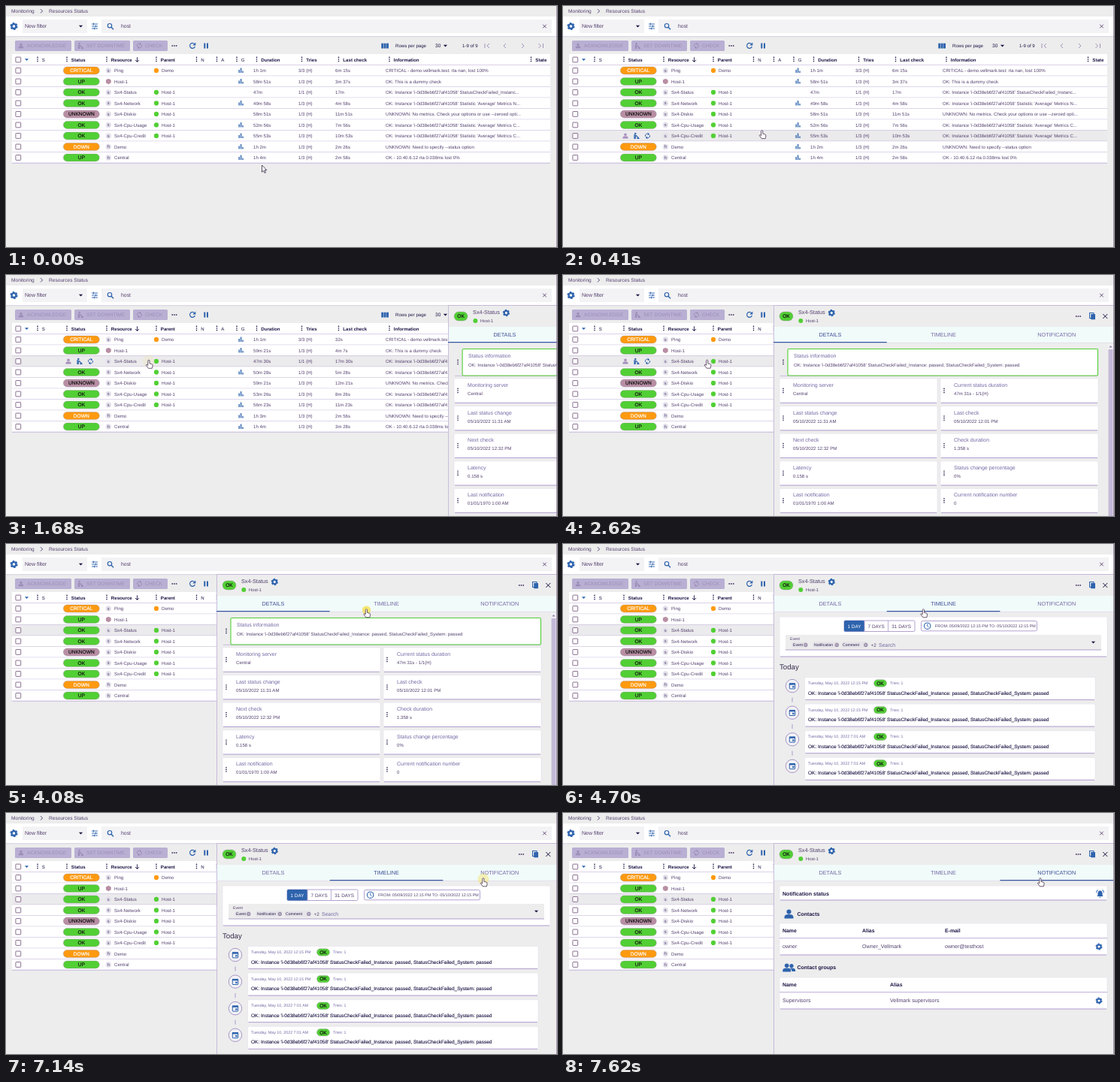
An HTML page that plays this animation: 733 px wide and 321 px high, repeating every 8 s.

```html
<!DOCTYPE html>
<html lang="en">
<head>
<meta charset="utf-8">
<title>Resource monitoring</title>
<style>
  html, body { margin: 0; width: 100%; height: 100%; overflow: hidden; background: #ededed; }
  svg { display: block; width: 733px; height: 321px; }
  text { font-family: "Liberation Sans", Arial, sans-serif; text-rendering: geometricPrecision; white-space: pre; }
</style>
</head>
<body>
<svg id="stage" viewBox="0 0 733 321" xmlns="http://www.w3.org/2000/svg"></svg>
<script>
const LOOP = 8000;
const BLUE = '#2e63ad', INK = '#54406f', DARK = '#1d1545', SOFT = '#7468a4', LINE = '#ab98cc';
const GREEN = '#52cf35', ORANGE = '#ff9a10', MAUVE = '#b88ea4', GREY = '#ededed', FIELD = '#f3f2f4';

// Drawing helpers
const rect = (x, y, w, h, fill, extra = '') =>
  `<rect x="${x}" y="${y}" width="${w}" height="${h}" fill="${fill}" ${extra}/>`;
const circle = (x, y, r, fill, extra = '') => `<circle cx="${x}" cy="${y}" r="${r}" fill="${fill}" ${extra}/>`;
const path = (d, fill = 'none', extra = '') => `<path d="${d}" fill="${fill}" ${extra}/>`;
const stroke = (color, width = 1) => `stroke="${color}" stroke-width="${width}"`;
const group = (body, attrs = '') => `<g ${attrs}>${body}</g>`;
const at = (x, y, body, k = 1) => group(body, `transform="translate(${x} ${y}) scale(${k})"`);
const text = (x, y, s, size = 6.1, fill = INK, extra = '') =>
  `<text x="${x}" y="${y}" font-size="${size}" fill="${fill}" ${extra}>${s}</text>`;
const bold = (x, y, s, size = 6.15, fill = DARK) => text(x, y, s, size, fill, 'font-weight="700"');
const middle = (x, y, s, size, fill, extra = '') => text(x, y, s, size, fill, 'text-anchor="middle" ' + extra);
const card = (x, y, w, h) => rect(x, y, w, h, '#fff', 'rx="1.5" ' + stroke('#e0dbe8', .5)) +
  path(`M${x + 1} ${y + h}h${w - 2}`, 'none', stroke(LINE, .9));

// Icons
const dots = (x, y, fill = DARK) => [-2.6, 0, 2.6].map(d => circle(x, y + d, .8, fill)).join('');
const more = (x, y) => [-2.7, 0, 2.7].map(d => circle(x + d, y, .95, INK)).join('');
const caret = (x, y, fill = DARK) => path(`M${x - 2.6} ${y - 1.2}h5.2l-2.6 2.8z`, fill);
const gear = (x, y, r = 3) => circle(x, y, r * .9, 'none', stroke(BLUE, r * .7)) +
  circle(x, y, r * 1.35, 'none', stroke(BLUE, r * .4) + ` stroke-dasharray="${r * .75} ${r * .664}"`);
const cross = (x, y, r, color, w = 1) => path(`M${x - r} ${y - r}l${2 * r} ${2 * r}m0 ${-2 * r}l${-2 * r} ${2 * r}`, 'none', stroke(color, w));
const checkbox = (x, y) => rect(x - 3.4, y - 3.4, 6.8, 6.8, '#fff', 'rx=".6" ' + stroke('#8b6f92', 1));
const person = (x, y, fill, k = 1) => at(x, y, circle(0, -1.7, 1.8, fill) + path('M-3.5 3.5v-1.2q0-2 3.5-2t3.5 2v1.2z', fill), k);
const sync = (x, y, color) => at(x, y, path('M-3 .8a3 3 0 0 1 5-2.9M3-.8a3 3 0 0 1-5 2.9', 'none', stroke(color, 1)) +
  path('M.4-4.2l2.2 2-2.2 1.6zM-.4 4.2l-2.2-2 2.2-1.6z', color));
const worker = (x, y, color) => at(x, y, circle(-1.2, -3, 1.2, color) +
  path('M-2.5 4v-5l3 1 1.2 2v2M-1 0l-.4 4', 'none', stroke(color, 1.2)) + path('M.8 4l1.8-3 1.8 3z', color));
const bell = (x, y) => at(x, y, path('M-3.7 3.5l1-1.3v-2.6q.3-2.4 2.7-2.8q2.4.4 2.7 2.8v2.6l1 1.3zM-1.2 4.1h2.4l-1.2 1.2z', BLUE) +
  path('M-4.3-.9q.2-2 1.7-3.2M4.3-.9q-.2-2-1.7-3.2', 'none', stroke(BLUE, .9)), 1.15);
const graph = (x, y) => [[-3, 4], [-.6, 6.4], [1.8, 2.4]].map(([d, h]) => rect(x + d, y + 3 - h, 1.4, h, BLUE)).join('');
const pill = (x, y, w, h, label, fill, ink = '#111', size = 6.6) =>
  rect(x - w / 2, y - h / 2, w, h, fill, `rx="${h / 2}" ` + stroke('#9a8fa0', .4)) +
  middle(x, y + size * .36, label, size, ink, stroke(ink, .2));
const okPill = (x, y, w, h) => pill(x, y, w, h, 'OK', GREEN);

// Table
const INSTANCE = "OK: Instance 'i-0d38eb6f27af41058' ";
const PASSED = INSTANCE + 'StatusCheckFailed_Instance: passed, StatusCheckFailed_System: passed';
// status, type, name, parent, has graph, tries, information, [duration, last check] before and after the refresh
const ROWS = [
  ['CRITICAL', 's', 'Ping', 'Demo', 1, '3/3 (H)', 'CRITICAL - demo.vellmark.test: rta nan, lost 100%', ['1h 1m', '6m 15s'], ['1h 1m', '32s']],
  ['UP', '', 'Host-1', '', 1, '1/3 (H)', 'OK: This is a dummy check', ['58m 51s', '3m 37s'], ['59m 21s', '4m 7s']],
  ['OK', 's', 'Sx4-Status', 'Host-1', 0, '1/1 (H)', INSTANCE + 'StatusCheckFailed_Instanc...', ['47m', '17m'], ['47m 30s', '17m 30s']],
  ['OK', 's', 'Sx4-Network', 'Host-1', 1, '1/3 (H)', INSTANCE + "Statistic 'Average' Metrics N...", ['49m 58s', '4m 58s'], ['50m 28s', '5m 28s']],
  ['UNKNOWN', 's', 'Sx4-Diskio', 'Host-1', 0, '1/3 (H)', 'UNKNOWN: No metrics. Check your options or use --zeroed opti...', ['58m 51s', '11m 51s'], ['59m 21s', '12m 21s']],
  ['OK', 's', 'Sx4-Cpu-Usage', 'Host-1', 1, '1/3 (H)', INSTANCE + "Statistic 'Average' Metrics C...", ['52m 56s', '7m 56s'], ['53m 26s', '8m 26s']],
  ['OK', 's', 'Sx4-Cpu-Credit', 'Host-1', 1, '1/3 (H)', INSTANCE + "Statistic 'Average' Metrics C...", ['55m 53s', '10m 53s'], ['56m 23s', '11m 23s']],
  ['DOWN', 'h', 'Demo', '', 1, '1/3 (H)', 'UNKNOWN: Need to specify --status option', ['1h 2m', '2m 26s'], ['1h 3m', '2m 56s']],
  ['UP', 'h', 'Central', '', 1, '1/3 (H)', 'OK - 10.40.6.12 rta 0.038ms lost 0%', ['1h 4m', '2m 58s'], ['1h 4m', '3m 28s']]
];
const FILL = { CRITICAL: ORANGE, DOWN: ORANGE, UNKNOWN: MAUVE };
const ROW_TOP = 78.7, ROW_H = 14.5;

function tableRow([status, type, name, parent, chart, tries, info], i) {
  const y = ROW_TOP + ROW_H * (i + .5), base = y + 2.2;
  const hot = FILL[status] === ORANGE;
  return rect(8, y - ROW_H / 2, 716, ROW_H, '#fff', `id="row${i}"`) +
    path(`M8 ${y + ROW_H / 2}h716`, 'none', stroke(LINE, .7)) + checkbox(16.3, y) +
    group(pill(100.3, y, 48, 10, status, FILL[status] || GREEN, hot ? '#fff' : '#111'), `id="status${i}"`) +
    group(person(83, y, '#a68fbd') + worker(97.5, y, BLUE) + sync(112.5, y, BLUE), `id="tools${i}"`) +
    (type ? circle(136.3, y, 3.7, '#e3e0ea') + middle(136.3, y + 2, type, 5.8, INK)
      : path(`M136.3 ${y - 3.8}l3.4 1.9v3.8l-3.4 1.9l-3.4-1.9v-3.8z`, MAUVE)) +
    text(144, base, name) +
    (parent ? circle(200, y, 3.1, parent === 'Demo' ? ORANGE : GREEN) + text(207, base, parent) : '') +
    (chart ? graph(312.5, y) : '') +
    text(329, base, '', 6.1, INK, `id="duration${i}"`) + text(389, base, tries) +
    text(438, base, '', 6.1, INK, `id="last${i}"`) + text(505, base, info);
}

function listView() {
  const heads = [[42, 'S'], [81, 'Status'], [134, 'Resource'], [200, 'Parent'], [253.5, 'N'], [280.5, 'A'], [307, 'G'],
    [333.5, 'Duration'], [393.5, 'Tries'], [442.5, 'Last check'], [510, 'Information'], [698.5, 'State']];
  const button = (x, w, label) => rect(x, 46, w, 14, '#b9afd3', 'rx="1.5"') +
    text(x + 16, 55.4, label, 6.6, '#9b8db8');
  const page = d => path(d, 'none', stroke('#a193b8', 1));
  return text(7, 9, 'Monitoring', 6.6) + path('M46 4.2l2.6 2.6-2.6 2.6', 'none', stroke(INK, 1)) +
    text(57, 9, 'Resources Status', 6.6) +
    rect(0, 14, 733, 26.5, '#fff') + path('M0 40.7h733', 'none', stroke('#c9bfd9', .7)) +
    gear(10.5, 27, 3.3) + rect(22, 18, 86, 18, FIELD) + text(25, 29.3, 'New filter', 7) + caret(99.5, 27) +
    [-3, 0, 3].map((d, i) => path(`M114 ${27 + d}h8M${[116.5, 119.5, 117.5][i]} ${25.6 + d}v2.8`, 'none', stroke(BLUE, .9))).join('') +
    rect(127, 18, 599, 18, FIELD) +
    circle(138, 26.2, 2.7, 'none', stroke(BLUE, 1.2)) + path('M140 28.2l3 3', 'none', stroke(BLUE, 1.4)) +
    text(153, 29.3, 'host', 6.9) + cross(716.5, 27, 2.3, INK, .9) +
    button(12, 75, 'ACKNOWLEDGE') + button(91, 74, 'SET DOWNTIME') + button(169, 46, 'CHECK') +
    person(20, 53, '#9b8db8', .9) + worker(99, 53, '#9b8db8') + sync(177.5, 53, '#9b8db8') +
    more(224, 53) + path('M250.8 50.6a3.5 3.5 0 1 0 .6 3.4', 'none', stroke(BLUE, 1.2)) + path('M252.3 48.5v4h-4z', BLUE) +
    rect(263.3, 49.5, 2, 7, BLUE) + rect(267, 49.5, 2, 7, BLUE) +
    [499.3, 502.7, 506.1].map(x => rect(x, 49.7, 2.9, 6.8, BLUE)).join('') +
    text(518, 55.2, 'Rows per page', 6.1, DARK) + text(571, 55.2, '30', 6.6, DARK) + caret(584.5, 53) + text(607, 55.2, '1-9 of 9', 6.1, DARK) +
    page('M637 50v6M643 50l-3 3 3 3') + page('M665 50l-3 3 3 3') + page('M686 50l3 3-3 3') + page('M708.5 50l3 3-3 3M714.5 50v6') +
    rect(8, 64, 716, 15, '#fff') + path(`M8 ${ROW_TOP}h716`, 'none', stroke(LINE, .8)) +
    checkbox(16.3, 71.5) + caret(27.5, 71.5, BLUE) +
    heads.map(([x, s]) => dots(x, 71, DARK) + (s.length > 1 ? bold(x + 5.8, 73.7, s) : text(x + 5.8, 73.7, s, 6.1, DARK))).join('') +
    path('M174.5 68.3v6M172 72l2.5 2.5 2.5-2.5', 'none', stroke(DARK, .9)) +
    ROWS.map(tableRow).join('');
}

// Side panel
function detailsView() {
  const facts = [
    ['Monitoring server', 'Central', 'Current status duration', '47m 31s - 1/1(H)'],
    ['Last status change', '05/10/2022 11:31 AM', 'Last check', '05/10/2022 12:01 PM'],
    ['Next check', '05/10/2022 12:32 PM', 'Check duration', '1.358 s'],
    ['Latency', '0.158 s', 'Status change percentage', '0%'],
    ['Last notification', '01/01/1970 1:00 AM', 'Current notification number', '0']
  ];
  const fact = (x, y, title, value) => card(x, y, 210, 32.3) + dots(x + 5, y + 16) +
    text(x + 18, y + 11, title, 7, SOFT) + text(x + 18, y + 22, value);
  return card(288, 98, 424, 36) + rect(288.3, 98.3, 10.5, 35.4, GREY) + dots(293, 116) +
    rect(299, 98.5, 412.5, 35.5, '#fff', 'rx="1.5" ' + stroke(GREEN, 1.1)) +
    text(307, 110, 'Status information', 7, SOFT) + text(307, 122.3, PASSED) +
    facts.map((f, i) => fact(288, 138 + 36.6 * i, f[0], f[1]) + fact(502, 138 + 36.6 * i, f[2], f[3])).join('') +
    rect(725, 92, 7, 229, '#f1f0f3') + path('M726.3 96.5h4.4l-2.2-2.6z', '#8d80a8') + rect(725.5, 99, 6, 222, '#c3b9d8');
}

function timelineView() {
  const times = ['12:15 PM', '12:15 PM', '7:01 AM', '7:01 AM'];
  const chip = (x, w, label) => rect(x - 2, 130, w + 9, 8.5, '#e6e4e9', 'rx="4"') + text(x, 136.2, label, 5.1, DARK) +
    circle(x + w + 3.8, 134.4, 2.6, '#988ca8') + cross(x + w + 3.8, 134.4, 1, '#fff', .6);
  const event = (time, i) => {
    const y = 177.5 + 35.6 * i;
    return circle(305, y + 11.5, 8.7, '#f3f2f6', stroke('#9d8cc0', .9)) +
      rect(301.3, y + 8.4, 7.4, 7, 'none', 'rx=".6" ' + stroke(BLUE, 1)) + rect(301, y + 7.8, 8, 2.4, BLUE) +
      rect(305.2, y + 11.6, 2.3, 2.3, BLUE) + (i < 3 ? path(`M305 ${y + 27}v6`, 'none', stroke(LINE, 1)) : '') +
      card(321.5, y, 386.5, 30) + text(326, y + 9.6, `Tuesday, May 10, 2022 ${time}`, 5.33, SOFT) +
      okPill(422, y + 8, 17, 9.4) + text(435, y + 9.6, 'Tries: 1', 5.3, SOFT) + text(326, y + 23, PASSED, 6.5, DARK, stroke(DARK, .12));
  };
  return card(288, 97, 436, 53) + rect(374, 102, 94, 14.5, '#fff', 'rx="1.5" ' + stroke(LINE, .9)) +
    rect(374, 102, 27, 14.5, BLUE, 'rx="1.5"') + path('M401 102v14.5M432.5 102v14.5', 'none', stroke(LINE, .8)) +
    middle(387.5, 111.6, '1 DAY', 6.4, '#fff') + middle(416.7, 111.6, '7 DAYS', 6.4, INK) + middle(450.2, 111.6, '31 DAYS', 6.4, INK) +
    rect(476.5, 102.5, 154, 13.3, '#fff', 'rx="2" ' + stroke(LINE, .9)) +
    circle(484.7, 109.2, 4.2, 'none', stroke(BLUE, 1.1)) + path('M484.7 106.5v2.9l2 1.3', 'none', stroke(BLUE, .9)) +
    text(495, 111.2, 'FROM: 05/09/2022 12:15 PM TO: 05/10/2022 12:15 PM', 5.4) +
    rect(296, 121, 420, 20, GREY) + path('M296 141h420', 'none', stroke('#9d8cc0', .8)) + text(302, 127.7, 'Event', 5.1) +
    chip(306, 13, 'Event') + chip(334, 26.5, 'Notification') + chip(372, 27, 'Comment') +
    text(409.5, 136.7, '+2', 6.4) + text(420, 136.9, 'Search', 7, SOFT) + caret(705.5, 131) +
    text(288, 167, 'Today', 9.7, '#35294d') + times.map(event).join('');
}

function notificationView() {
  const table = (y, x2, cells, heads) => card(288, y, 436, 42) + path(`M288 ${y + 19.7}h436`, 'none', stroke(LINE, .8)) +
    heads.map((h, i) => bold([292, x2, 508][i], y + 11.6, h, 6.9)).join('') +
    cells.map((c, i) => text([292, x2, 508][i], y + 32.9, c, 7.1)).join('') + gear(713, y + 31, 2.9);
  return card(288, 97, 436, 19) + bold(292, 109.6, 'Notification status', 7.1) + bell(714.5, 107) +
    person(300.5, 134.5, BLUE, 1.7) + bold(311.5, 136.7, 'Contacts', 7) +
    table(147, 398, ['owner', 'Owner_Vellmark', 'owner@testhost'], ['Name', 'Alias', 'E-mail']) +
    person(304, 206, BLUE, 1.45) + person(297.7, 206, GREY, 1.9) + person(297.7, 206, BLUE, 1.55) +
    bold(311.5, 208.3, 'Contact groups', 7) +
    table(219, 435, ['Supervisors', 'Vellmark supervisors'], ['Name', 'Alias']);
}

const TABS = [['DETAILS', detailsView], ['TIMELINE', timelineView], ['NOTIFICATION', notificationView]];
const TAB_W = 150.7;

function panel() {
  return rect(280, 41, 453, 280, GREY) + rect(280, 69, 453, 21, '#f0fbfa') +
    path('M280.5 321v-280.5h453', 'none', stroke('#c3b6d8', .9)) + path('M280 90.3h453', 'none', stroke('#dcd6e4', .6)) +
    okPill(297, 55, 18, 12) + text(313, 52.3, 'Sx4-Status', 7.3) + gear(357.3, 50.5, 3) +
    circle(316.3, 61, 3, GREEN) + text(323, 63, 'Host-1', 5.8) + more(685.5, 55) +
    rect(700.5, 50.5, 5.5, 7, 'none', stroke(BLUE, 1)) + rect(702.2, 52, 5.8, 7.3, BLUE, 'rx=".6"') + cross(721.3, 55, 3, DARK, 1) +
    TABS.map(([label], i) => middle(280 + TAB_W * (i + .5), 82.2, label, 7.3, SOFT, `id="tab${i}"`)).join('') +
    rect(280, 89, TAB_W, 1.2, '#35549f', 'id="indicator"') +
    TABS.map(([, view], i) => group(view(), `id="view${i}"`)).join('');
}

const pointer = group(path('M0 0v9.2l2.1-2 1.5 3.3 1.5-.7-1.5-3.2h2.8z', '#fff', stroke('#33243f', .8)), 'id="arrow"') +
  group(path('M-1.2 .9q1.1-1.6 2.2 0v4l2.6.6q1.8.5 1.5 2.2l-.7 3.6h-5l-3-4.2q.2-1.3 1.5-.5l.9.8z', '#fff', stroke('#4a3550', .8) + ' stroke-linejoin="round"'), 'id="hand"');

document.getElementById('stage').innerHTML = rect(0, 0, 733, 321, GREY) + listView() + group(panel(), 'id="panel"') +
  path('M732.6 0v321', 'none', stroke('#8d7399', .8)) +
  circle(0, 0, 6, '#f6e04a', 'id="ripple"') + group(pointer, 'id="cursor"');

// Motion
const $ = id => document.getElementById(id);
const clamp = v => Math.max(0, Math.min(1, v));
const phase = (t, a, b) => clamp((t - a) / (b - a));
const ease = p => (1 - Math.cos(Math.PI * p)) / 2;
const easeOut = p => 1 - (1 - p) ** 3;
const show = (id, on) => $(id).setAttribute('display', on ? 'inline' : 'none');
const move = (id, x, y) => $(id).setAttribute('transform', `translate(${x} ${y})`);

const START = [340.5, 212];
const MOVES = [ // from, to, x, y
  [40, 810, 180, 113], [1210, 1480, 190, 113], [2580, 3400, 478, 95], [3420, 3740, 479.5, 86.5], [5420, 6140, 635, 86.5]
];
const CLICKS = [1400, 4000, 6920];
const SWITCHES = [4270, 7170];
const REFRESH = 880, OPEN = 1640;

function cursorAt(t) {
  let [x, y] = START;
  for (const [a, b, tx, ty] of MOVES) {
    const p = ease(phase(t, a, b));
    x += (tx - x) * p;
    y += (ty - y) * p;
  }
  return [x, y];
}

function render(t) {
  const [x, y] = cursorAt(t);
  const opened = t >= OPEN;
  const row = Math.floor((y + 1 - ROW_TOP) / ROW_H);
  const hovered = (opened && x > 280) || row >= ROWS.length ? -1 : row;
  ROWS.forEach((data, i) => {
    $('row' + i).setAttribute('fill', i === hovered || (opened && i === 2) ? '#ebeaec' : '#fff');
    show('status' + i, i !== hovered);
    show('tools' + i, i === hovered);
    const [duration, last] = data[t < REFRESH ? 7 : 8];
    $('duration' + i).textContent = duration;
    $('last' + i).textContent = last;
  });

  show('panel', opened);
  move('panel', 453 * (1 - easeOut(phase(t, OPEN, 1980))), 0);
  const tab = SWITCHES.filter(s => t >= s).length;
  const slide = SWITCHES.reduce((sum, s) => sum + ease(phase(t, s, s + 300)), 0);
  $('indicator').setAttribute('x', 280 + TAB_W * slide);
  TABS.forEach((_, i) => {
    show('view' + i, i === tab);
    $('tab' + i).setAttribute('fill', i === tab ? '#3f4f96' : SOFT);
  });

  const click = CLICKS.find(c => t >= c && t < c + 300);
  show('ripple', click !== undefined);
  if (click !== undefined) {
    const p = (t - click) / 300;
    $('ripple').setAttribute('r', 4.5 + 4 * p);
    $('ripple').setAttribute('opacity', .85 * (1 - p * p));
    move('ripple', x, y + 1.5);
  }

  const clickable = hovered >= 0 || y < 90;
  show('hand', clickable);
  show('arrow', !clickable);
  move('cursor', x, y);
}

const begin = performance.now();
function tick() {
  render((performance.now() - begin) % LOOP);
  requestAnimationFrame(tick);
}
tick();
</script>
</body>
</html>
```
